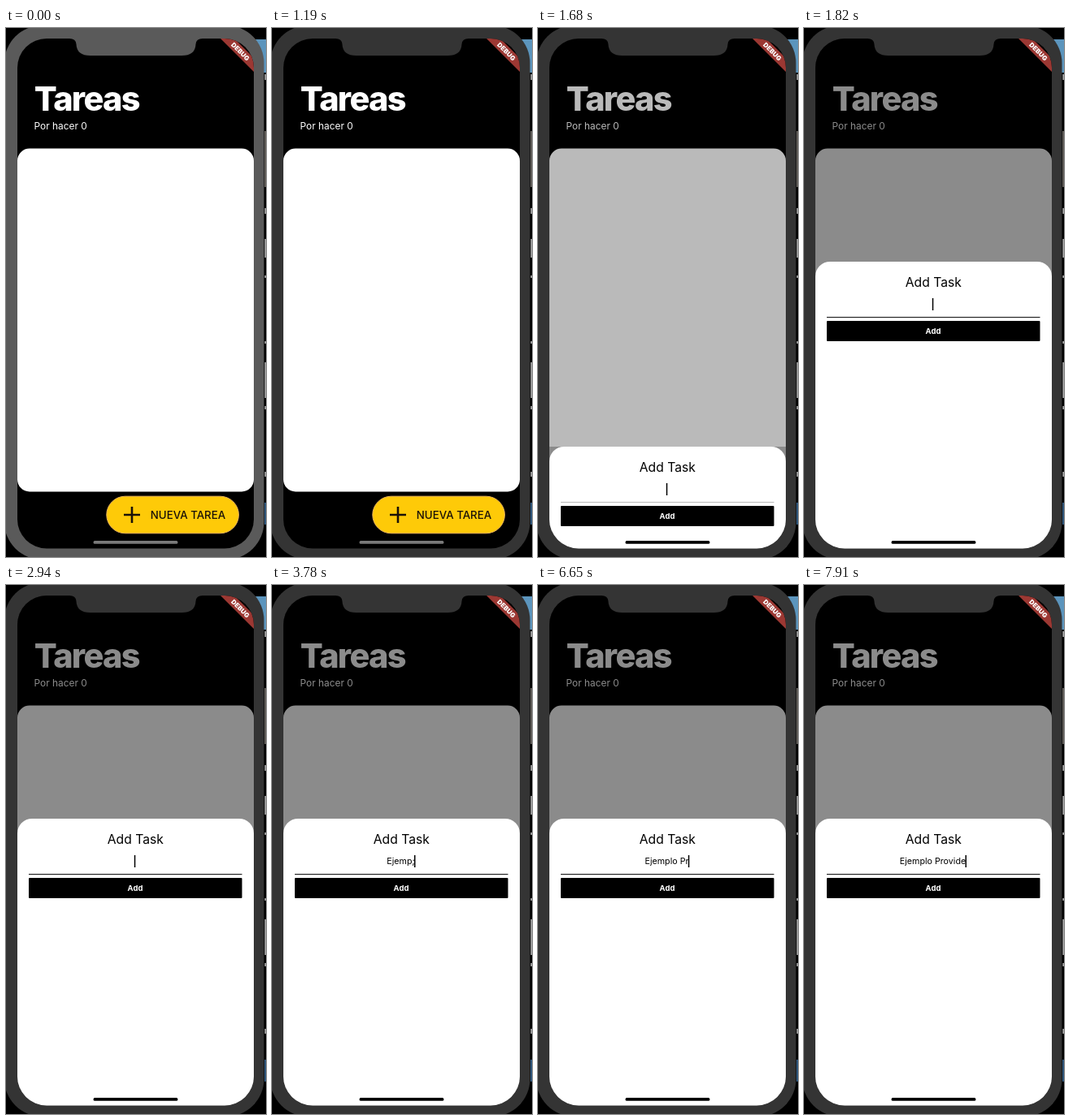
Write an HTML page that moves like this. It is 320x652 px and loops after 8000 ms.

```html
<!DOCTYPE html>
<html lang="es">
<head>
<meta charset="utf-8">
<title>Tareas</title>
<style>
  html, body { margin: 0; width: 100%; height: 100%; overflow: hidden; background: #000; }
  svg { display: block; width: 320px; height: 652px; }
  text { font-family: Inter, "Open Sans", sans-serif; }
  .mid { text-anchor: middle; }
</style>
</head>
<body>
<svg viewBox="0 0 320 652">
  <defs>
    <clipPath id="screen"><rect x="14" y="13" width="291" height="628.5" rx="36"/></clipPath>
  </defs>

  <!-- desktop behind the phone -->
  <rect width="320" height="652"/>
  <rect x="300" y="14" width="20" height="41" fill="#5c95bd"/>
  <path d="M319 127V196" stroke="#5d5955" stroke-width="2"/>
  <path d="M319 585V612" stroke="#2c5378" stroke-width="2"/>
  <path d="M319.2 57v7M319.2 222v7M319.2 260v23M319.2 305v3M319.2 386v3M319.2 412v44M319.2 466v4M319.2 547v6" stroke="#aaa" stroke-width="1.6"/>

  <rect id="body" x="-2" y="-3" width="319.5" height="658" rx="46"/>
  <g clip-path="url(#screen)">
    <rect width="320" height="652"/>
    <text x="34.8" y="102" font-size="41.5" font-weight="800" letter-spacing="-1.7" fill="#fff">Tareas</text>
    <text x="34.5" y="125" font-size="11.9" fill="#fff">Por hacer 0</text>
    <rect x="14" y="148.5" width="291" height="423" rx="15" fill="#fff"/>
    <rect id="fab" x="123.8" y="577.2" width="162.6" height="45.6" rx="22.8" stroke="#efb65c"/>
    <circle id="ripple" cx="200" cy="600" fill="#e8ac42"/>
    <path d="M145 600h20M155 590v20" stroke="#1a1208" stroke-width="2.6"/>
    <text x="177.8" y="605" font-size="13.3" font-weight="500" fill="#1a1208">NUEVA TAREA</text>

    <rect id="scrim" width="320" height="652"/>

    <g id="sheet">
      <rect x="14" width="291" height="420" fill="#8b8b8b"/>
      <rect x="14" width="291" height="420" rx="18" fill="#fff"/>
      <text class="mid" x="159.3" y="30.5" font-size="15.7">Add Task</text>
      <text class="mid" id="field" x="158.5" y="56" font-size="10.7"></text>
      <rect id="caret" y="45" width="1.5" height="15"/>
      <path id="line" d="M28 68.5H290.5"/>
      <rect x="28" y="73" width="262.5" height="25" rx="1"/>
      <text class="mid" x="159" y="89" font-size="9.5" font-weight="700" fill="#fff">Add</text>
    </g>

    <g transform="translate(288.5 29) rotate(45)">
      <rect x="-40" y="-6" width="80" height="12" fill="#9c3833"/>
      <text class="mid" y="2.9" font-size="8" font-weight="900" fill="#fff">DEBUG</text>
    </g>
  </g>
  <path id="notch" d="M78 12.5V13Q86 13 86.5 20Q87 34 104 34H216Q233 34 233.5 20Q234 13 242 13V12.5Z"/>
  <rect id="home" x="107.5" y="632" width="104" height="3.8" rx="1.9"/>
</svg>
<script>
const LOOP = 8000, STEP = 70;
const typed = [
  [0, ""], [3080, "E"], [3220, "Ej"], [3360, "Eje"], [3430, "Ejem"], [3640, "Ejemp"],
  [3780, "Ejemp;"], [3850, "Ejemp"], [3990, "Ejempl"], [4060, "Ejemplo"], [4130, "Ejemplo "],
  [6370, "Ejemplo P"], [6650, "Ejemplo Pr"], [6790, "Ejemplo Pro"], [7490, "Ejemplo Prov"],
  [7630, "Ejemplo Provi"], [7770, "Ejemplo Provid"], [7910, "Ejemplo Provide"]
];
const sheetTop = [[0, 652], [1680, 516], [1750, 345], [1820, 288]];
const dimming = [[0, 0], [1680, .27], [1750, .4], [1820, .455]];
const blinks = [[2380, 2800], [4480, 4900], [5460, 5880]];

const el = id => document.getElementById(id);
const set = (id, attrs) => { for (const k in attrs) el(id).setAttribute(k, attrs[k]); };
const clamp = v => Math.max(0, Math.min(1, v));
const at = (keys, t) => keys.filter(k => k[0] <= t).pop()[1];
const mix = (a, b, p) => `rgb(${a.map((v, i) => Math.round(v + (b[i] - v) * p))})`;

function caretOpacity(t) {
  const ramp = start => clamp((t - start + STEP) / (3 * STEP));
  return Math.min(...blinks.map(([out, back]) => 1 - ramp(out) + ramp(back)), 1);
}

function draw(now) {
  const t = Math.floor(now % LOOP / STEP) * STEP;
  const bezel = t < 1120 ? "#5a5a5a" : "#343434";
  set("body", { fill: bezel });
  set("notch", { fill: bezel });

  const press = clamp((t - 1400) / 210);
  set("fab", { fill: mix([254, 202, 8], [238, 201, 78], press) });
  set("ripple", { r: 10 * press, opacity: .8 * press });

  set("scrim", { opacity: at(dimming, t) });
  set("sheet", { transform: `translate(0 ${at(sheetTop, t)})` });
  set("line", { stroke: t < 1750 ? "#999" : "#111", "stroke-width": t < 1750 ? .7 : 1 });
  set("home", { fill: t < 1680 ? "#7a7a7a" : "#000" });

  // a trailing space moves the caret but not the centred text
  const text = at(typed, t), shown = text.trim();
  el("field").textContent = shown;
  const width = shown ? el("field").getComputedTextLength() : 0;
  set("caret", { x: 157.8 + width / 2 + (text.length - shown.length) * 3, opacity: caretOpacity(t) });
}

const start = performance.now();
function tick() {
  draw(performance.now() - start);
  requestAnimationFrame(tick);
}
tick();
</script>
</body>
</html>
```
